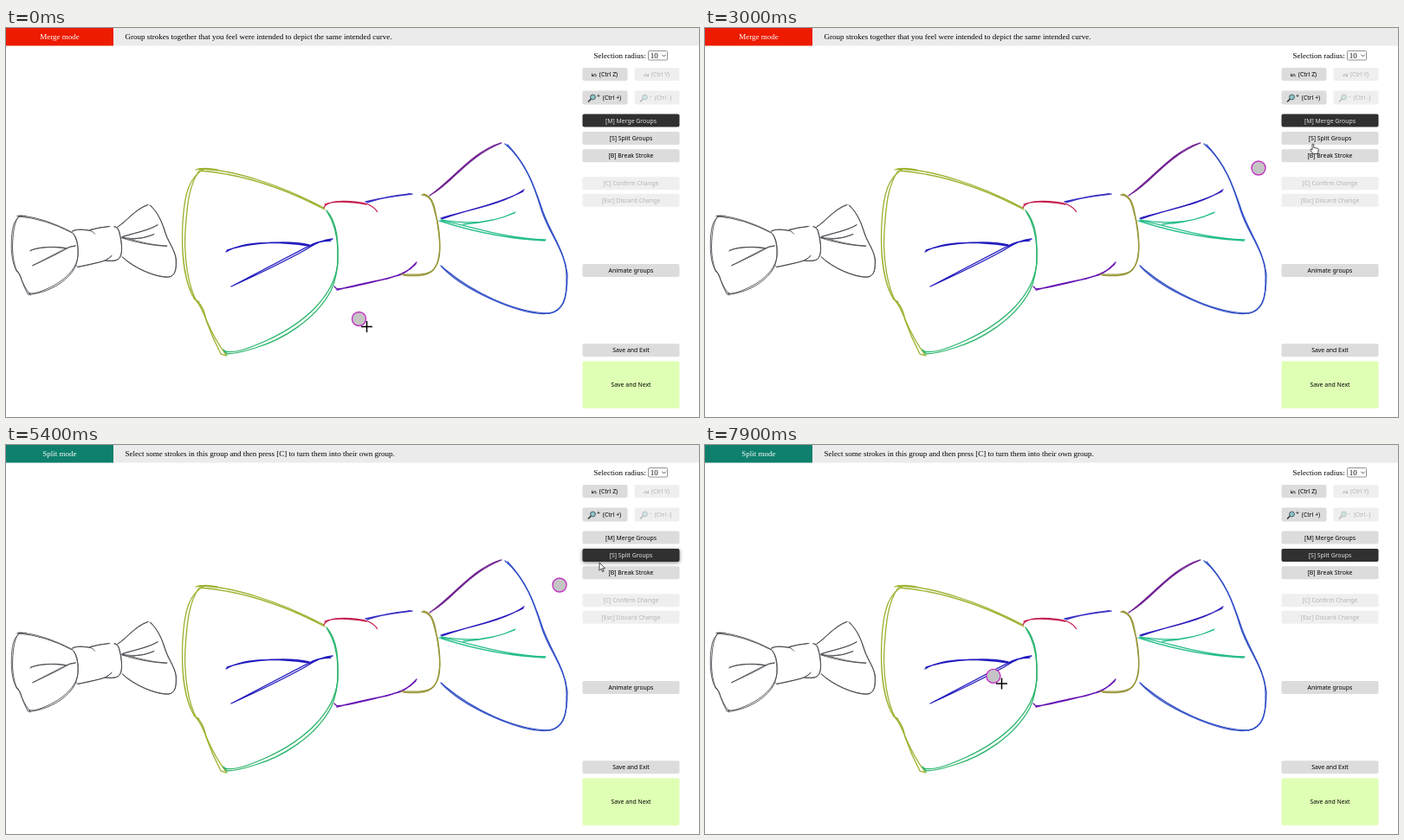
An HTML page for the animation above (8000 ms loop, 800 px wide and 450 px high).

```html
<!DOCTYPE html>
<html lang="en">
<head>
<meta charset="utf-8">
<title>Stroke grouping</title>
<style>
html, body { margin: 0; width: 100%; height: 100%; overflow: hidden; background: #fff; }
svg { display: block; }
text { font: 9px "Liberation Serif", serif; }
.button text { font: 6.9px "Noto Sans", sans-serif; text-anchor: middle; }
.button rect { fill: #dcdcdc; }
.button.off rect { fill: #efefef; }
.button.off text { fill: #b4b4b4; }
.button.off .icon { opacity: .3; }
.button.on rect { fill: #303030; }
.button.on text { fill: #e4e4e4; }
.button.next rect { fill: #dfffb4; }
.line { fill: none; stroke-linecap: round; stroke-linejoin: round; }
</style>
</head>
<body>
<svg width="800" height="450" viewBox="0 0 800 450">
  <rect width="800" height="20.5" fill="#ebebeb"/>
  <rect id="badge" width="124" height="20.5"/>
  <text id="mode" x="62" y="13.3" fill="#fff" text-anchor="middle"/>
  <text id="hint" x="137.5" y="13.3"/>
  <text x="678.5" y="34.8">Selection radius:</text>
  <rect x="741.5" y="26.5" width="22" height="10.5" rx="1" fill="#fff" stroke="#777" stroke-width=".8"/>
  <text x="743.8" y="35">10</text>
  <path class="line" d="M757.5 31l2 2 2-2" stroke="#333" stroke-width=".8"/>
  <g id="panel"></g>
  <g id="thumb" class="line" transform="translate(-81 148) scale(.4285 .4245)" stroke-width="2"></g>
  <g id="bow" class="line" stroke-width="1.3"></g>
  <circle id="brush" r="8" fill="#c4c4c4" stroke="#c433c4" stroke-width="1.4"/>
  <path id="cross" d="M-6.5 0H6.5M0-6.5V6.5" stroke="#000" stroke-width="1.5"/>
  <path id="arrow" d="M0 0V9.2L2.2 7.2 3.7 10.6 5.1 10 3.6 6.7H6.5Z" fill="#fff" stroke="#222" stroke-width=".8"/>
  <path id="hand" d="M0 0.6Q1-.5 1.8.6V4.4L6.4 5.3Q7.4 5.7 7.2 7L6.3 11.6H1.2L-2 7.4Q-2.3 6-1 6.2L0 7Z" fill="#fff" stroke="#222" stroke-width=".8"/>
</svg>
<script>
const $ = id => document.getElementById(id);

const strokes = [
  ['#9db12f', 'M222 163C262 163 318 182 367 208M224 165Q295 171 368 210M219 164Q228 161 244 164'],
  ['#9db12f', 'M229 163C212 172 206 190 204 225C202 265 207 297 218 314Q228 320 231 338Q238 358 248 377L255 379'],
  ['#9db12f', 'M223 165C211 182 209 205 207 235C205 268 211 300 220 316C229 325 232 350 254 378M217 313L223 317'],
  ['#2bb56c', 'M370 211C385 228 383 255 383 272C379 310 345 341 302 361C282 370 264 377 252 374'],
  ['#2bb56c', 'M371 213C387 238 386 280 375 304C357 338 318 361 288 370Q266 377 255 377L251 372'],
  ['#2019bd', 'M254 259C275 246 315 247 350 252M255 257C285 247 330 246 350 251'],
  ['#2019bd', 'M260 299C295 283 325 268 345 257Q362 245 377 244M262 298Q312 272 348 253Q360 246 375 246'],
  ['#c41f50', 'M367 208C371 197 405 200 418 204Q426 208 428.5 212.5M368 204C380 199 398 201 416 204'],
  ['#3930c4', 'M415 201Q440 195 469 192M417 202Q436 195 466 192'],
  ['#6512b4', 'M379 299L382 302C405 300 438 290 457 285Q467 279 474 271M382 303Q405 297 440 290Q463 284 473 273'],
  ['#99973a', 'M480 193C494 194 493 210 498 223C503 250 501 270 494 279C487 287 470 285 456 285'],
  ['#99973a', 'M482 192C495 195 496 213 499 233C503 262 500 272 493 280C486 288 470 287 459 286'],
  ['#712392', 'M490 193C513 182 530 150 572 133M489 194C515 176 540 142 571 133'],
  ['#3351c6', 'M576 134C600 154 610 184 618 210C627 240 649 260 647 292C648 320 639 331 620 330.5C590 330 527 303 503 276'],
  ['#3351c6', 'M579 135C604 162 611 187 620 213C630 240 645 258 648 285C648 317 641 327 628 330C590 330 538 307 502 275'],
  ['#2c1bbd', 'M502 220C530 211 575 204 598 187M503 221C536 209 565 205 597 189'],
  ['#25bd8a', 'M502 222C525 226 558 228 588 213M528 227Q562 225 587 214'],
  ['#25bd8a', 'M500 223C540 236 580 244 622 246M503 223C535 228 570 243 623 245'],
];
const draw = ink => strokes.map(([color, d]) => `<path d="${d}" stroke="${ink || color}"/>`).join('');
$('bow').innerHTML = draw();
$('thumb').innerHTML = draw('#44444a');

const button = (x, y, w, h, label, { kind = '', id = '', shift = 0, icon = '' } = {}) =>
  `<g class="button ${kind}" id="${id}"><rect x="${x}" y="${y}" width="${w}" height="${h}" rx="2"/>
   <text x="${x + w / 2 + shift}" y="${y + h / 2 + 2.5}">${label}</text>${icon}</g>`;
const wide = (y, label, kind, id, h = 15) => button(665.5, y, 112, h, label, { kind, id });

const undo = (x, flip) => `<path class="icon line" stroke="#222" stroke-width=".8"
  transform="translate(${x} 54) scale(${flip} 1)" d="M-2.5-1V1.5H0M-2.3 1.3Q0-2 2 0V2"/>`;
const lens = (x, sign) => `<g class="icon" transform="translate(${x} 80)">
  <path d="M-2 2L-5 5" stroke="#333" stroke-width="1.6" stroke-linecap="round"/>
  <circle r="2.9" fill="#8cc5c9" stroke="#3d5558" stroke-width=".9"/>
  <text x="6.5" y="1" style="fill:#000">${sign}</text></g>`;

$('panel').innerHTML = [
  button(665.5, 46, 52, 15, '(Ctrl Z)', { shift: 4, icon: undo(679, 1) }),
  button(725.5, 46, 52, 15, '(Ctrl Y)', { shift: 4, kind: 'off', icon: undo(739, -1) }),
  button(665.5, 72.5, 52, 16, '(Ctrl +)', { shift: 8, icon: lens(677.5, '+') }),
  button(725.5, 72.5, 52, 16, '(Ctrl -)', { shift: 7, kind: 'off', icon: lens(737.5, '-') }),
  wide(99.5, '[M] Merge Groups', '', 'merge'),
  wide(120, '[S] Split Groups', '', 'split'),
  wide(140.3, '[B] Break Stroke'),
  wide(172.2, '[C] Confirm Change', 'off'),
  wide(191.8, '[Esc] Discard Change', 'off'),
  wide(273, 'Animate groups'),
  wide(365.3, 'Save and Exit'),
  wide(385.5, 'Save and Next', 'next', '', 54.5),
].join('');

// Pointer hotspot: time, x, y
const pointer = [
  [0, 416.5, 345.5], [1500, 416.5, 345.5], [1600, 426, 340], [2000, 500, 290],
  [2400, 590, 225], [2700, 648, 171], [3000, 701, 134], [3900, 701, 134],
  [4000, 704.5, 130], [5200, 704.5, 130], [5400, 685, 136], [5700, 685, 136],
  [5900, 648, 171], [6300, 565, 265], [6900, 470, 283], [7000, 427, 285],
  [7100, 382, 285], [7300, 345, 290], [7600, 322, 285], [7800, 341, 277],
  [7900, 342.5, 276], [8000, 342.5, 276],
];
const LOOP = 8000, STEP = 100, LAG = 40;
const EXIT = 2700, ENTER = 5900, HOVER = 3000, CLICK = 4700, LEAVE = 5400, FADE = 300;
const modes = [
  ['Merge mode', '#ed1b00', 'Group strokes together that you feel were intended to depict the same intended curve.'],
  ['Split mode', '#0e806d', 'Select some strokes in this group and then press [C] to turn them into their own group.'],
];
const clamp = v => Math.min(1, Math.max(0, v));

function pointerAt(t) {
  const i = Math.max(1, pointer.findIndex(key => key[0] >= t));
  const [t0, x0, y0] = pointer[i - 1], [t1, x1, y1] = pointer[i];
  const k = clamp((t - t0) / (t1 - t0));
  return [x0 + (x1 - x0) * k, y0 + (y1 - y0) * k];
}

function place(id, [x, y], visible = true) {
  $(id).setAttribute('transform', `translate(${x} ${y})`);
  $(id).style.display = visible ? '' : 'none';
}

function render(t) {
  const splitting = t >= CLICK;
  const [title, color, hint] = modes[+splitting];
  $('mode').textContent = title;
  $('hint').textContent = hint;
  $('badge').setAttribute('fill', color);
  $('merge').classList.toggle('on', !splitting);
  $('split').classList.toggle('on', splitting);

  const glow = clamp((t - HOVER) / FADE) * clamp((LEAVE + FADE - t) / FADE);
  $('split').firstChild.style.filter = glow ? `drop-shadow(0 1px 2px rgba(0,0,0,${0.5 * glow}))` : '';

  const tip = pointerAt(t);
  const outside = t > EXIT && t < ENTER;
  const hovering = t >= HOVER && t < LEAVE;
  place('cross', tip, !outside);
  place('arrow', tip, outside && !hovering);
  place('hand', tip, hovering);

  // The brush trails the pointer and waits at the edge of the drawing area.
  const late = Math.max(0, t - LAG);
  const [x, y] = pointerAt(late > EXIT && late < ENTER ? EXIT : late);
  place('brush', [x - 9, y - 9]);
}

function frame(now) {
  render(Math.floor(now % LOOP / STEP) * STEP);
  requestAnimationFrame(frame);
}
render(0);
requestAnimationFrame(frame);
</script>
</body>
</html>
```
